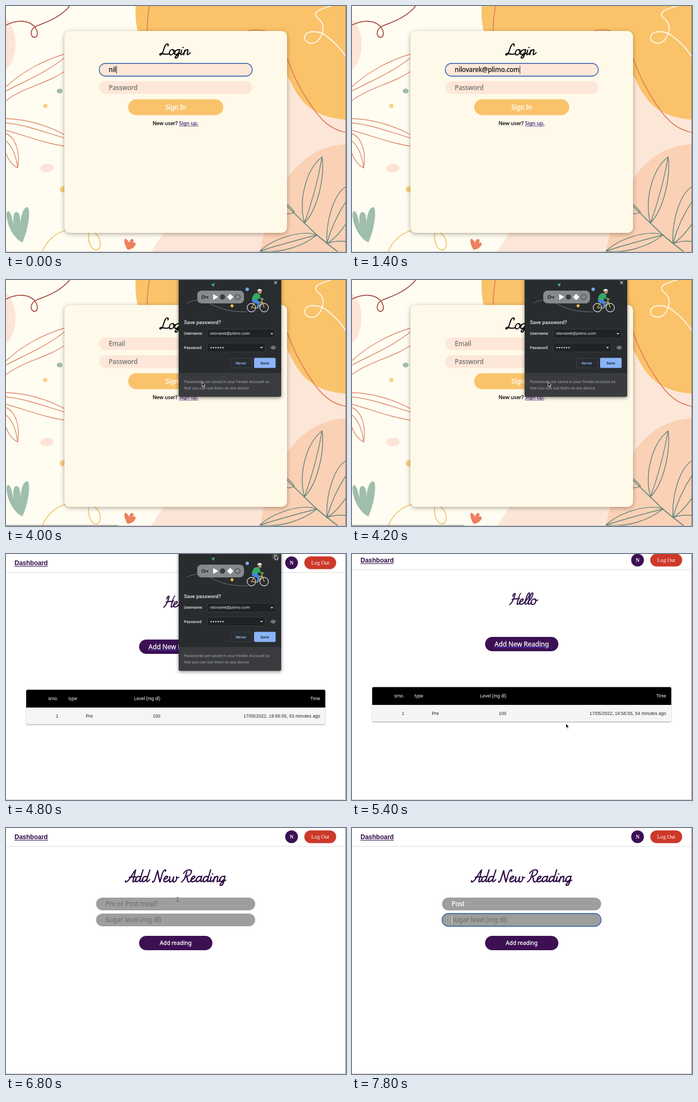
Recreate the animation shown at these times as an HTML page with a canvas. Size 640 by 463 pixels, loop 8 s.

```html
<!DOCTYPE html>
<html lang="en">
<head>
<meta charset="utf-8">
<title>Sign in and add a reading</title>
<style>
html, body { margin: 0; width: 100%; height: 100%; overflow: hidden; background: #fff; }
canvas { display: block; width: 100%; height: 100%; }
</style>
</head>
<body>
<canvas id="stage" role="img" aria-label="Login, Hello, Add New Reading"></canvas>
<script>
const W = 640, H = 463, LOOP = 8000, STEP = 200;
const canvas = document.getElementById('stage');
const ratio = window.devicePixelRatio || 1;
canvas.width = W * ratio;
canvas.height = H * ratio;
const ctx = canvas.getContext('2d');

const ROUND = '"Noto Sans", "Open Sans", sans-serif';
const ARIAL = '"Liberation Sans", Arial, sans-serif';
const TIMES = '"Liberation Serif", Times, serif';
const UI = 'Roboto, Inter, sans-serif';
const EMAIL = 'nilovarek@plimo.com';
const PURPLE = '#3c1053', INK = '#2d0b45', GOLD = '#fac36b', BLUSH = '#fde7d9';

// Script letters: upright pen strokes on baseline 0, slanted when drawn.
const PEN = {
  L: [17, 'M11-17C12-21 8-22 6-18C4-13 6-5 3-1C2 1-1 0 0-2C2-5 9 1 16-2'],
  H: [18, 'M3-15C2-20 6-22 6-18C6-10 4-2 1 0M16-20C14-20 14-6 14-2C14 1 17 0 19-4M3-9C8-12 12-9 16-11'],
  A: [17, 'M0-2C0 2 4 0 7-7C9-13 11-19 13-21C13-15 13-6 13-2C13 1 16 0 18-4M5-8C9-10 12-8 16-9'],
  N: [19, 'M0-1C0 2 3 0 3-5L4-20C6-14 11-4 13 0C14-6 12-16 15-20C16-22 19-21 18-19'],
  R: [17, 'M6-18C5-10 6-3 1 0M1-15C2-22 15-24 14-16C13-11 9-10 6-10C10-10 10 1 14 0C16 0 17-2 18-4'],
  a: [12, 'M8-8C5-11 0-10 0-4C0 1 5 1 8-6M8-10L8-4C8 1 11 0 13-4'],
  d: [12, 'M8-8C5-11 0-10 0-4C0 1 5 1 8-6M9-21L8-4C8 1 11 0 13-4'],
  e: [9, 'M0-5C5-5 7-9 4-10C1-10 0-7 0-4C0 1 6 1 9-4'],
  g: [11, 'M8-9C3-12 0-7 0-4C0 0 5 1 8-5L8-10M8-9C8-2 9 6 5 6C1 6 3 1 11-3'],
  i: [6, 'M1-9L1-3C1 1 4 0 6-4M2-14l.5 .1'],
  l: [6, 'M0-5C5-9 7-20 4-21C1-21 1-9 1-4C1 1 5 0 7-4'],
  n: [11, 'M1-9L1 0M1-5C3-11 7-11 7-7L7-3C7 1 10 0 12-4'],
  o: [10, 'M4-10C1-10 0-7 0-5C0-2 1 0 4 0C7 0 8-3 8-5C8-8 7-10 4-10M6-9C7-7 9-7 11-8'],
  w: [15, 'M0-9C2-4 0 0 3 0C6 0 7-5 7-9C7-3 7 0 10 0C13 0 14-6 12-9C12-7 14-7 16-8'],
  ' ': [7, '']
};

function script(str, x, y, size, color, weight) {
  ctx.save();
  ctx.translate(x, y);
  ctx.transform(size, 0, -0.25 * size, size, 0, 0);
  ctx.strokeStyle = color;
  ctx.lineWidth = weight;
  ctx.lineCap = ctx.lineJoin = 'round';
  for (const ch of str) {
    ctx.stroke(new Path2D(PEN[ch][1]));
    ctx.translate(PEN[ch][0], 0);
  }
  ctx.restore();
}

function text(str, x, y, font, color, align = 'left', spacing = 0) {
  ctx.font = font;
  ctx.fillStyle = color;
  ctx.textAlign = align;
  ctx.letterSpacing = spacing + 'px';
  ctx.fillText(str, x, y);
  // The rounded face is a little heavier than regular.
  if (font.endsWith(ROUND)) {
    ctx.strokeStyle = color;
    ctx.lineWidth = 0.3;
    ctx.strokeText(str, x, y);
  }
  const width = ctx.measureText(str).width;
  ctx.letterSpacing = '0px';
  return width;
}

function rect(x, y, w, h, color) {
  ctx.fillStyle = color;
  ctx.fillRect(x, y, w, h);
}

function round(x, y, w, h, r, fill, line, weight = 1.4) {
  ctx.beginPath();
  ctx.roundRect(x, y, w, h, r);
  if (fill) { ctx.fillStyle = fill; ctx.fill(); }
  if (line) { ctx.strokeStyle = line; ctx.lineWidth = weight; ctx.stroke(); }
}

function oval(x, y, rx, ry, color, tilt = 0) {
  ctx.beginPath();
  ctx.ellipse(x, y, rx, ry, tilt, 0, 7);
  ctx.fillStyle = color;
  ctx.fill();
}

function ring(x, y, r, color, weight) {
  ctx.beginPath();
  ctx.arc(x, y, r, 0, 7);
  ctx.strokeStyle = color;
  ctx.lineWidth = weight;
  ctx.stroke();
}

function shape(d, color) {
  ctx.fillStyle = color;
  ctx.fill(new Path2D(d));
}

function line(d, color, weight = 1.5) {
  ctx.strokeStyle = color;
  ctx.lineWidth = weight;
  ctx.stroke(new Path2D(d));
}

function shadow(color, blur, dy) {
  ctx.shadowColor = color;
  ctx.shadowBlur = blur * ratio;
  ctx.shadowOffsetY = dy * ratio;
}

function backdrop() {
  rect(0, 0, W, H, '#fffdf2');
  shape('M273 463C300 425 330 360 420 310L500 80H640V463Z', '#fce6d8');
  shape('M244 0C243 22 245 55 262 85L500 95C545 120 530 206 640 214V0Z', '#fac36a');
  shape('M478 463C492 385 530 266 640 260V463Z', '#fad1b5');
  oval(-12, 72, 30, 52, '#fce5d8');

  line('M0 36C22 25 42 27 53 38C62 49 60 59 53 59C45 58 45 43 57 38C72 31 100 24 120 0', '#a94b3f', 1.8);
  const coral = '#de8766';
  line('M0 152C30 124 70 102 112 90M0 160C38 140 78 124 112 96M0 178C35 152 78 146 112 122', coral, 1.4);
  line('M0 212C38 213 78 225 112 243M0 220C40 224 76 239 112 249M0 234C40 245 75 259 112 264', coral, 1.4);
  line('M0 240C18 248 27 274 22 305C5 295 2 282 0 277M0 254C12 264 19 282 22 305', coral, 1.4);
  line('M270 0Q266 22 265.500 48M455 47Q472 43 488 47' +
    'M529 98C540 130 556 160 571 182C594 219 614 233 640 238', '#df7954', 1.6);
  line('M612 0C590 6 574 12 588 24C602 34 597 52 590 62C580 76 560 70 562 58C565 44 592 46 605 58' +
    'C618 68 630 80 640 96', '#fffaf0', 1.8);

  oval(101, 160, 5.5, 4.5, '#9dbfac');
  oval(74, 188, 4, 4, '#fad084', 0.5);
  oval(77, 305, 12.5, 8, '#fce4d6', -0.1);
  oval(107, 345, 6, 6, '#fad084');
  shape('M31 445C18 440 2 417 1 393C1 382 8 384 11 398L15 414C12 396 15 386 21 388C27 390 27 402 27 412' +
    'C28 391 34 377 41 379C47 385 42 421 31 445Z', '#9fbeac');
  shape('M229 459C224 452 221 441 224 438C227 438 230 442 232 446C232 441 236 437 239 439C241 441 240 444 238 447' +
    'C241 443 244 445 244 448C243 454 236 458 229 459Z', '#ed8061');
  line('M68 463C81 431 110 417 140 419M156 427C153 442 160 459 170 459C182 457 179 434 165 426', '#f3c46d', 1.8);

  const teal = '#5f827c';
  line('M525 373L585 431Q604 447 625 463', teal, 1.7);
  line('M562 408C550 371 563 309 595 284C600 322 587 382 562 408Q584 347 595 284', teal, 1.4);
  line('M585 431C555 420 502 439 478 461C514 466 557 454 585 431Q530 445 478 461', teal, 1.4);
  line('M640 340C618 353 602 402 604 447C617 440 631 423 640 410M604 447Q616 404 640 368', teal, 1.4);
  line('M525 370Q537 379 543 388Q535 393 525 390M604 447Q622 441 640 443', teal, 1.4);
}

function button(label, x, y, w, h, color, font, dy) {
  round(x, y, w, h, h / 2, color);
  text(label, x + w / 2, y + h / 2 + dy, font, '#fff', 'center');
}

function field(x, y, w, fill, value, hint, ink, focused, caret) {
  round(x, y, w, 24, 12, fill, focused && '#1f53a6', 1.3);
  const used = text(value || hint, x + 18, y + 16.3, '12px ' + ROUND, value ? ink : '#757575');
  if (caret) rect(x + 18.5 + (value ? used : 0), y + 4.5, 0.9, 15, ink);
}

function login(k) {
  backdrop();
  shadow('rgba(60,40,20,.4)', 9, 2);
  round(110, 47, 419, 380, 10, '#fff9ea');
  shadow('transparent', 0, 0);
  script('Login', 289.5, 92, 1, '#080808', 2.2);

  const sent = k >= 16;
  const typed = sent ? 0 : Math.min(EMAIL.length, [3, 5, 7, 9, 11, 14, 17, 19][Math.min(k, 7)]);
  const dots = sent ? 0 : Math.max(0, Math.min(6, (k - 8) * 2));
  const onEmail = k < 8, onPass = k >= 8 && !sent;
  field(175.5, 108, 288, BLUSH, EMAIL.slice(0, typed), 'Email', '#111', onEmail, onEmail);
  field(175.5, 141.5, 288, BLUSH, dots ? ' ' : '', 'Password', '#111', onPass, onPass && !dots);
  for (let i = 0; i < dots; i++) oval(196 + i * 4.6, 153.3, 1.5, 1.5, '#111');

  const hover = k >= 12 && k < 17;
  button('Sign In', 230, 175.5, 179, 30, hover ? '#f8ba4e' : GOLD, '12px ' + ROUND, 4);
  const small = '9.7px ' + ROUND, visited = '#4b2a80';
  const lead = text('New user? ', 276, 224.3, small, '#111');
  const link = text('Sign up.', 276 + lead, 224.3, small, visited);
  rect(276 + lead, 225.6, link, 0.8, visited);
  if (k >= 18) rect(0, 461.5, 211, 2, '#35373a');
}

function cyclist() {
  for (const x of [462, 486]) ring(x, 52, 8, '#d6dadd', 1.3);
  line('M462 52L469 41L482 42L474 53ZM486 52L481 37L485 36', '#e9bb55', 1.3);
  shape('M463 36L472 36L478 43L475 53L472 53L473 45L463 41Z', '#4485df');
  shape('M463 37C463 29 469 23 475 25L479 29L474 37Z', '#37a867');
  line('M475 28L478 34L484 36', '#37a867', 2.4);
  oval(478, 22, 3.2, 4, '#c68c6a');
  shape('M473 21C473 16 480 15 482 20Z', '#e5e7e9');
}

function dialog(hot) {
  shadow('rgba(0,0,0,.5)', 6, 2);
  round(325, -10, 193, 229.5, 3, '#282c2f');
  shadow('transparent', 0, 0);
  round(325, 175, 193, 44.5, [0, 0, 3, 3], '#3a3b3e');
  if (hot) oval(507.5, 5, 7, 7, '#46494c');
  line('M504.7 2.2l5.5 5.5m0-5.5l-5.5 5.5', '#d5d7da', 1.1);

  const dark = '#383c40';
  line('M341 44C353 35 371 38 386 45C407 56 424 60 454 60', '#74797e', 1);
  round(360, 20, 88, 24, 8, '#858a8f');
  ring(371.5, 32, 2.7, dark, 1.7);
  line('M374 32H381M379 32V35', dark, 1.8);
  shape('M390 26.5L399.5 32L390 37.5Z', '#fff');
  oval(407.5, 32, 5, 5, dark);
  shape('M422 26L428 32L422 38L416 32Z', '#fff');
  ring(436, 32, 4.8, dark, 1.1);
  shape('M386 8L393 6L391 13Z', '#3bac67');
  oval(454, 17.5, 3.2, 3.2, '#7aa5f0');
  shape('M425 45L429 48L426 52L422 49Z', '#f2bd54');
  cyclist();

  const white = '#e8eaed';
  text('Save password?', 335, 83, '500 9.6px ' + UI, white);
  text('Username', 335, 103.3, '500 7.5px ' + UI, white);
  text('Password', 335, 129.7, '500 7.5px ' + UI, white);
  round(379, 92.5, 128, 17, 1, '#202326', '#3d4144', 0.8);
  round(379, 118.5, 109, 17, 1, '#202326', '#3d4144', 0.8);
  text(EMAIL, 384, 103.3, '7.8px ' + UI, white);
  for (let i = 0; i < 6; i++) oval(386 + i * 4.5, 127.3, 1.2, 1.2, white);
  shape('M498 100H503L500.5 102.8ZM478.5 126H483.5L481 128.8Z', white);
  line('M498.5 127.3Q503 121.5 507.5 127.3Q503 132.5 498.5 127.3Z', '#9ca1a6', 1.1);
  oval(503, 127.3, 1.5, 1.5, '#9ca1a6');

  round(422.5, 147, 40, 18.5, 2, null, '#44484c', 0.8);
  round(467, 146.5, 40.5, 19, 2, '#8ab4f8');
  text('Never', 442.2, 158.8, '500 7.7px ' + UI, '#8ab4f8', 'center');
  text('Save', 487, 158.8, '500 7.7px ' + UI, '#202428', 'center');
  text('Passwords are saved in your Fendlo Account so', 335, 193.7, '7.6px ' + UI, '#a1a5aa');
  text('that you can use them on any device', 335, 205.7, '7.6px ' + UI, '#a1a5aa');
}

function header() {
  rect(0, 34, W, 1, '#dedede');
  const w = text('Dashboard', 16, 21, 'bold 12px ' + ARIAL, INK);
  rect(16, 22.5, w, 1.1, INK);
  oval(537.5, 16.5, 12, 12, PURPLE);
  text(EMAIL[0].toUpperCase(), 537.5, 20.2, 'bold 10px ' + TIMES, '#fff', 'center');
  button('Log Out', 561.5, 4.5, 60, 24, '#cd3829', '10.2px ' + TIMES, 3.8);
}

function dashboard(k) {
  const late = k >= 26;
  ctx.save();
  if (late && k < 29) ctx.translate(0, -5);
  header();
  script('Hello', 296, 100, 1.03, INK, 2.1);
  button('Add New Reading', 250.5, 161, 138, 27, PURPLE, '12.3px ' + ROUND, 4.2);
  rect(268, 180.2, 103, 1, '#4540d8');

  shadow('rgba(0,0,0,.4)', 2, 1);
  round(38, 255.5, 563, 65, 2.5, '#f5f5f5');
  shadow('transparent', 0, 0);
  round(38, 255.5, 563, 33.5, [2.5, 2.5, 0, 0], '#000');
  const minutes = late ? 54 : 53;
  const rows = [
    [275.3, '#fff', 'srno.', 'type', 134, 'Level (mg dl)', 'Time'],
    [308, '#222', '1', 'Pre', 163.5, '100', `17/05/2022, 19:56:55, ${minutes} minutes ago`]
  ];
  for (const [y, color, num, type, typeX, level, time] of rows) {
    const cell = (s, x) => text(s, x, y, '8.4px ' + ARIAL, color, 'right', 0.09);
    cell(num, 98.5);
    cell(type, typeX);
    cell(level, 290.5);
    cell(time, 591.5);
  }
  ctx.restore();
}

function reading(k) {
  header();
  script('Add New Reading', 224.5, 101.5, 1.07, INK, 2.2);
  const meal = 'Post'.slice(0, [0, 1, 2, 4][Math.max(0, Math.min(3, k - 35))]);
  const first = k >= 35 && k < 39, second = k >= 39;
  field(169.5, 131, 299.5, '#9e9e9e', meal, 'Pre or Post meal?', '#fff', first, first);
  field(169.5, 161, 299.5, '#9e9e9e', '', 'Sugar level (mg dl)', '#fff', second, second);
  button('Add reading', 250.5, 203, 138, 27, PURPLE, '10.4px ' + ROUND, 3.8);
}

// Pointer stops: time, x, y
const PATH = [
  [2000, 452, 300], [2600, 370, 192], [4000, 369, 192], [4200, 369, 192], [4800, 506.5, 2],
  [5000, 506, 3], [5400, 402.5, 319], [5600, 402, 318], [6000, 336, 172], [6400, 323, 170],
  [6800, 323, 135], [7000, 323, 138], [7200, 323, 138]
];

function pointer(k) {
  const t = k * STEP;
  const i = PATH.findIndex(p => p[0] > t) - 1;
  if (i < 0) return;
  const [a, b] = [PATH[i], PATH[i + 1]];
  let u = (t - a[0]) / (b[0] - a[0]);
  u = u * u * (3 - 2 * u);
  ctx.save();
  ctx.translate(a[1] + (b[1] - a[1]) * u, a[2] + (b[2] - a[2]) * u);
  if (k >= 33) {
    const beam = 'M-2-4.5Q0-4.5 0-3V3Q0 4.5-2 4.5M2-4.5Q0-4.5 0-3M0 3Q0 4.5 2 4.5M-1.5 1H1.5';
    line(beam, '#eee', 2);
    line(beam, '#222', 0.9);
  } else {
    const hand = (k >= 12 && k < 17) || k >= 30;
    const d = hand
      ? 'M-1 0Q0-1 1 0V4L5 5Q6 5 5.5 8L4 10H0L-3 6Q-3 4.5-1 6Z'
      : 'M0 0V8.5L2 6.7L3.4 9.8L5 9L3.6 6H6.2Z';
    shape(d, hand ? '#fff' : '#111');
    line(d, hand ? '#222' : '#fff', 0.8);
  }
  ctx.restore();
}

function draw(now) {
  const k = Math.floor((now % LOOP) / STEP);
  ctx.setTransform(ratio, 0, 0, ratio, 0, 0);
  rect(0, 0, W, H, '#fff');
  if (k < 22) login(k);
  else if (k < 32) dashboard(k);
  else reading(k);
  if (k >= 19 && k < 25) dialog(k === 24);
  pointer(k);
  rect(639, 0, 1, H, '#77797c');
  rect(0, 462, W, 1, k < 22 ? '#c9c4b8' : '#c8c8c8');
}

let start;
function tick(now) {
  start ??= now;
  draw(now - start);
  requestAnimationFrame(tick);
}
draw(0);
requestAnimationFrame(tick);
</script>
</body>
</html>
```
